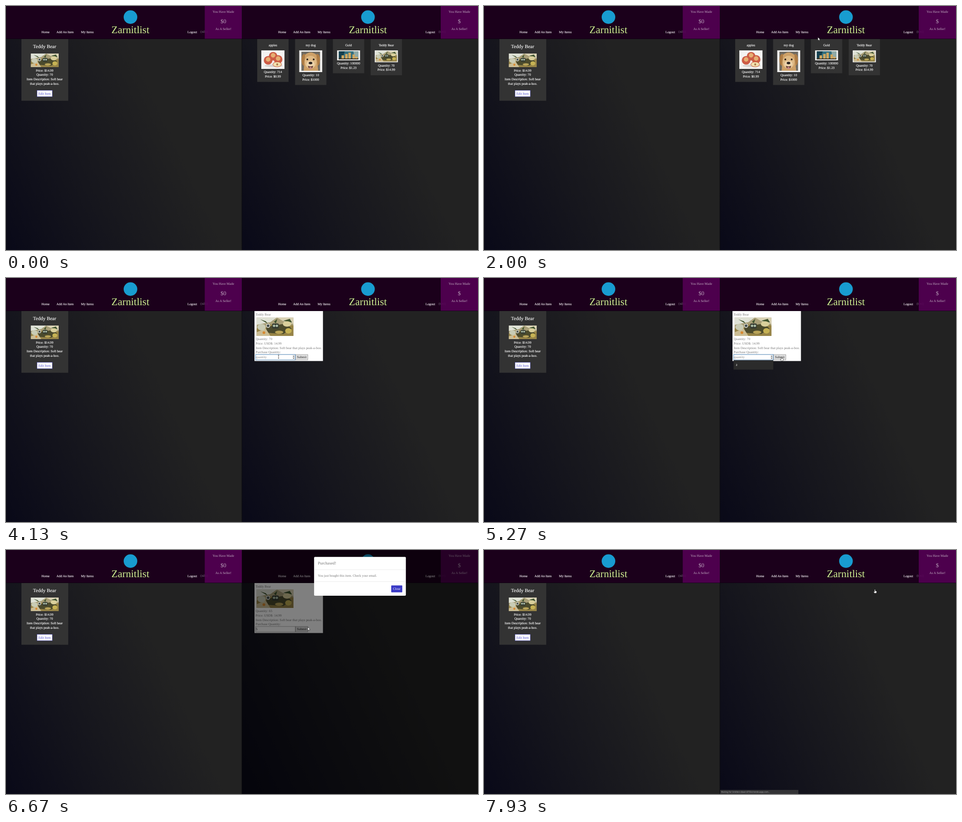
Animation, 1039 px wide and 539 px high, one loop 8000 ms. Source, as an HTML page:

```html
<!DOCTYPE html>
<html lang="en">
<head>
<meta charset="utf-8">
<title>Marketplace</title>
<style>
html, body { margin: 0; width: 100%; height: 100%; overflow: hidden; background: #1c1c1f; }
svg { display: block; }
#stage { width: 1039px; height: 539px; }
text { font-family: "Liberation Serif", serif; white-space: pre; text-rendering: geometricPrecision; }
.ui { font-family: "Open Sans", sans-serif; }
</style>
</head>
<body>
<svg id="stage" viewBox="0 0 1039 539"></svg>
<script>
const LOOP = 8000, SIZE = 7.28;
const GREY = '#747474';

const rect = (x, y, w, h, fill, more = '') =>
  `<rect x="${x}" y="${y}" width="${w}" height="${h}" fill="${fill}" ${more}/>`;
const circle = (x, y, r, fill) => `<circle cx="${x}" cy="${y}" r="${r}" fill="${fill}"/>`;
const ellipse = (x, y, rx, ry, fill) =>
  `<ellipse cx="${x}" cy="${y}" rx="${rx}" ry="${ry}" fill="${fill}"/>`;
const path = (d, fill, more = '') => `<path d="${d}" fill="${fill}" ${more}/>`;
const text = (x, y, s, fill = '#fff', size = SIZE, more = '') =>
  `<text x="${x}" y="${y}" font-size="${size}" fill="${fill}" ${more}>${s}</text>`;
const centered = (x, y, s, fill, size) => text(x, y, s, fill, size, 'text-anchor="middle"');
const bright = (x, y, s, size) =>
  text(x, y, s, '#fff', size, 'text-anchor="middle" stroke="#fff" stroke-width=".14"');
const group = (id, body) => `<g id="${id}">${body}</g>`;
const photo = (x, y, w, h, unitsW, unitsH, body) =>
  `<svg x="${x}" y="${y}" width="${w}" height="${h}" viewBox="0 0 ${unitsW} ${unitsH}" preserveAspectRatio="none">${body}</svg>`;

// Photos, as flat shapes
const toyTable = (x, y, w, h) => photo(x, y, w, h, 80, 40,
  rect(0, 0, 80, 40, '#a99f78') +
  path('M0 0H44L30 10 0 16Z', '#dfe2d6') +
  path('M44 0H80V14L60 9Z', '#d9d2b4') +
  path('M0 24L26 15 80 17V40H0Z', '#978447') +
  path('M8 4L20 8 25 14ZM30 2L38 9 45 3 42 13ZM58 7L72 3 77 11Z', '#3f542f') +
  path('M22 20L64 13 76 24 58 36 20 33Z', '#4b4a2c') +
  path('M0 32L20 24 30 40H0Z', '#cbbd94') +
  ellipse(11, 21, 9, 7, '#c9ccb5') + ellipse(66, 14, 9, 6, '#d9cf9b') + ellipse(69, 29, 7, 6, '#c6b254') +
  circle(25, 18, 4.5, '#e5e5df') + circle(25, 18, 3, '#46504c') +
  rect(34, 13, 14, 11, '#343b32', 'rx="2"') + circle(38, 18, 2.6, '#aebfa8') + circle(44, 18, 2.6, '#aebfa8') +
  ellipse(49, 32, 9, 3.5, '#b9a458') + circle(16, 33, 3, '#d88930'));

const apples = (x, y, w, h) => photo(x, y, w, h, 51, 41,
  rect(0, 0, 51, 41, '#f4f3f1') +
  ellipse(27, 34, 20, 3, '#d8d5d2') +
  [[26, 13], [15, 22], [37, 20]].map(([ax, ay]) =>
    circle(ax, ay, 9.5, '#cd5c45') + ellipse(ax, ay - 2, 5, 5, '#e6ae72')).join('') +
  ellipse(35, 31, 10, 6, '#c8583f') + ellipse(35, 31, 9, 5, '#f1dfad') + ellipse(35, 31, 2, 2.5, '#a97b4e'));

const dog = (x, y, w, h) => photo(x, y, w, h, 51, 48,
  rect(0, 0, 51, 48, '#efeeec') + rect(5, 3, 41, 42, '#706b62') +
  ellipse(11, 21, 6, 13, '#ae7c45') + ellipse(40, 21, 6, 13, '#ae7c45') +
  path('M10 45L13 10Q25 -1 38 10L42 45Z', '#cda067') +
  ellipse(25, 26, 13, 14, '#dfba86') + ellipse(25, 31, 9, 8, '#ecd2aa') +
  circle(18, 20, 2, '#2c211a') + circle(32, 20, 2, '#2c211a') +
  ellipse(25, 28, 4, 2.8, '#28201e') + path('M19 34Q25 37 31 34Q29 41 25 41Q21 41 19 34Z', '#593029') +
  ellipse(25, 39, 3, 2.5, '#c78983'));

const coins = (x, y, w, h) => photo(x, y, w, h, 51, 22,
  rect(0, 0, 51, 22, '#f1f1ee') + rect(4, 2, 43, 18, '#347080') +
  path('M4 2H17L12 20H4Z', '#16404f') + path('M36 2H47V20H39Z', '#8faaa7') +
  rect(4, 17, 43, 3, '#413b2f') +
  [[10, 7], [18, 10], [25, 13], [34, 9], [40, 4]].map(([left, tall]) =>
    rect(left, 18 - tall, 5.5, tall, '#cfa65f')).join(''));

// One browser window: backdrop, header, navigation and earnings panel
const night = x => `night${Math.ceil(x)}`;
const nightGradient = x =>
  `<linearGradient id="${night(x)}" gradientUnits="userSpaceOnUse" x1="${x}" y1="539" x2="${x + 400}" y2="353">
    <stop offset="0" stop-color="#090918"/><stop offset=".5" stop-color="#16161d"/><stop offset="1" stop-color="#222"/>
  </linearGradient>`;

function windowPane(x, nav, logoX, user, earned) {
  const mid = x + 478.5;
  const labels = ['Home', 'Add An Item', 'My Items', 'Logout'];
  return nightGradient(x) + rect(x, 0, 520, 539, `url(#${night(x)})`) +
    rect(x, 0, 520, 73, '#1b001b') + rect(x, 72, 520, 1, '#0f0012') +
    circle(logoX + 42, 24.5, 15, '#189cd0') +
    text(logoX, 60, 'Zarnitlist', '#cff291', 22.8) +
    labels.map((label, i) => text(nav[i], 60, label, '#fff', SIZE, 'stroke="#fff" stroke-width=".1"')).join('') +
    text(nav[4], 59.3, user, '#84748a') +
    rect(x + 437.5, 0, 82.5, 72.3, '#550055', 'opacity=".88"') +
    centered(mid, 14.5, 'You Have Made', '#c4b2c4') +
    centered(mid, 38, earned, '#b9a2b9', 12.6) +
    centered(mid, 53, 'As A Seller!', '#c4b2c4') +
    rect(x, 0, .7, 539, '#08080c', 'opacity=".7"') + rect(x + 518.3, 73, 1, 466, '#0b0b0d', 'opacity=".5"');
}

const ownItem = rect(34, 73, 103, 136.3, '#333') +
  bright(85, 93, 'Teddy Bear', 11) + toyTable(54.5, 105, 61.5, 30) +
  ['Price: $14.99', 'Quantity: 70', 'Item Description: Soft bear', 'that plays peak-a-boo.']
    .map((line, i) => bright(85, 144.5 + i * 9.73, line)).join('') +
  rect(68.3, 186.3, 33.6, 13.8, '#fff', 'stroke="#5050d0" stroke-width=".6"') +
  centered(85, 195.5, 'Edit Item', '#4545cd');

const listing = (x, height, name, image, imageH, quantity, price) =>
  rect(x, 73, 69, height, '#333') + bright(x + 34.5, 89.4, name) +
  image(x + 9, 98, 51, imageH) +
  bright(x + 34.5, 107.3 + imageH, `Quantity: ${quantity}`) +
  bright(x + 34.5, 117 + imageH, `Price: $${price}`);

const framedToy = (x, y, w, h) => rect(x, y, w, h, '#f1f1ee') + toyTable(x + 2, y + 1.6, w - 4, h - 3.2);

const listings =
  listing(553, 94.7, 'apples', apples, 41, 714, '0.99') +
  listing(636.3, 101.5, 'my dog', dog, 48, 10, '1000') +
  listing(719.6, 75.6, 'Gold', coins, 22, 100000, '1.23') +
  listing(802.7, 80, 'Teddy Bear', framedToy, 26.3, 70, '14.99');

const fields = (y, lines) =>
  lines.map((line, i) => text(549.5, y + i * 9.75, line, GREY)).join('');
const entry = y =>
  rect(549.4, y, 87.4, 12, '#fff', 'stroke="#8b8b8b" stroke-width=".7"') +
  rect(637.4, y, 27.2, 12, '#dedede', 'stroke="#8b8b8b" stroke-width=".7"') +
  centered(651, y + 8.2, 'Submit', '#222');

const emptyForm = rect(547, 73, 120, 60, '#fff') +
  fields(86.8, ['Quantity:', 'Price: USD$:', 'Item Description:', 'Purchase Quantity:']) +
  entry(118.9) + text(550, 127, 'quantity', '#858585');

const fullForm = rect(547, 73, 150.7, 110.4, '#fff') +
  text(549.5, 82.5, 'Teddy Bear', GREY) + toyTable(551.5, 87.3, 81.3, 40.6) +
  fields(137, ['Quantity: <tspan id="stock">70</tspan>', 'Price: USD$: 14.99',
    'Item Description: Soft bear that plays peak-a-boo.', 'Purchase Quantity:']) +
  entry(169) + text(550, 177.2, 'quantity', '#858585', SIZE, 'id="hint"') +
  text(550, 177.2, '5', '#222', SIZE, 'id="typed"') +
  group('focus',
    rect(549.4, 169, 87.4, 12, 'none', 'stroke="#5b9bd5" stroke-width=".9"') +
    rect(630.5, 170, 5.3, 10, '#eee') +
    path('M631.6 173.8L633.2 171.6 634.8 173.8ZM631.6 176.3L633.2 178.5 634.8 176.3Z', '#444')) +
  group('suggest', rect(549.4, 181.6, 87.4, 20.8, '#2b2b2b') +
    text(554.6, 194, '2', '#fff', 5.4, 'class="ui" font-weight="600"'));

const dialog = rect(678.2, 17.9, 202, 85.9, '#fff', 'rx="2"') +
  text(686.4, 34.8, 'Purchased!', GREY, 9.1) +
  rect(678.2, 46.2, 202, .6, '#dedede') + rect(678.2, 72.3, 202, .6, '#dedede') +
  text(686.4, 62, 'You just bought this item. Check your email.', GREY) +
  rect(848, 81, 24.3, 15.2, '#3a3ac6', 'rx="1"') + centered(860, 91, 'Close', '#fff');

const status = rect(520, 530, 172, 9, '#343436') +
  text(522, 536.3, 'Waiting for limitless-dawn-87554.herokuapp.com...', '#bcbcbc', 4.55, 'class="ui"');

const outline = 'stroke="#111" stroke-width=".6" stroke-linejoin="round"';
const pointer =
  group('arrow', path('M0 0V7.2L1.7 5.7 2.9 8.3 4.1 7.7 3 5.2H5.2Z', '#fff', outline)) +
  group('hand', path('M-.8 .6Q0 -.6 .8 .6V3.2L3.4 3.9Q4.2 4.3 3.9 5.7L3.1 8.5H-.9L-3 5.4Q-2.6 4.3 -.8 5.6Z', '#fff', outline)) +
  group('beam', path('M-1.3 -3.6H1.3M0 -3.6V3.6M-1.3 3.6H1.3', 'none', 'stroke="#222" stroke-width=".7"'));

document.getElementById('stage').innerHTML =
  windowPane(0, [78, 111, 165, 399.5, 428], 232, '(nilo)', '$0') + ownItem +
  windowPane(519.5, [599, 632, 686, 923.5, 952.3], 754.8, '(tavi)', '$') +
  group('listings', listings) + group('emptyForm', emptyForm) + group('fullForm', fullForm) +
  rect(519.5, 0, 520, 539, '#000', 'id="shade"') +
  group('dialog', dialog) + group('status', status) + group('pointer', pointer);

// Pointer stops: time, x, y
const route = [
  [600, 736, 56], [870, 735, 60], [1200, 744, 91], [1500, 744, 91], [1900, 735, 69], [2050, 735, 69],
  [2500, 853, 115], [2750, 853, 115], [3130, 747, 99.5], [3450, 742, 104], [3950, 600, 174],
  [4350, 600, 174], [4900, 655, 174.5], [6600, 655, 174.5], [7150, 860, 87], [LOOP, 860.5, 87]
];

const $ = id => document.getElementById(id);
const show = (id, on) => { $(id).style.display = on ? '' : 'none'; };
const ramp = (t, from, to) => Math.min(1, Math.max(0, (t - from) / (to - from)));
const within = (t, ...spans) => spans.some(([from, to]) => t >= from && t < to);

function pointerAt(t) {
  const next = Math.max(1, route.findIndex(stop => stop[0] > t));
  const [t0, x0, y0] = route[next - 1], [t1, x1, y1] = route[next];
  const p = ramp(t, t0, t1), eased = p * p * (3 - 2 * p);
  return [x0 + (x1 - x0) * eased, y0 + (y1 - y0) * eased];
}

function draw(t) {
  show('listings', t < 2720);
  show('emptyForm', within(t, [2720, 3300]));
  show('fullForm', within(t, [3300, 7730]));
  show('suggest', within(t, [4200, 5700]));
  show('focus', within(t, [4130, 6250]));
  show('hint', t < 5700);
  show('typed', t >= 5700);
  $('stock').textContent = t < 6480 ? '70' : '65';

  $('shade').setAttribute('opacity', t < 7730 ? ramp(t, 6325, 6475) * .5 : 0);
  const drop = 1 - ramp(t, 6480, 6780);
  show('dialog', within(t, [6480, 7730]));
  $('dialog').setAttribute('opacity', ramp(t, 6480, 6630));
  $('dialog').setAttribute('transform', `translate(0 ${-21 * drop * drop})`);
  show('status', t >= 7600);

  const hand = within(t, [1050, 1800], [2250, 2760], [4750, 6300], [7100, LOOP]);
  const beam = within(t, [3900, 4650]);
  show('pointer', t >= 600);
  show('hand', hand);
  show('beam', beam);
  show('arrow', !hand && !beam);
  $('pointer').setAttribute('transform', `translate(${pointerAt(t)})`);
}

const start = performance.now();
function tick() {
  draw((performance.now() - start) % LOOP);
  requestAnimationFrame(tick);
}
tick();
</script>
</body>
</html>
```
